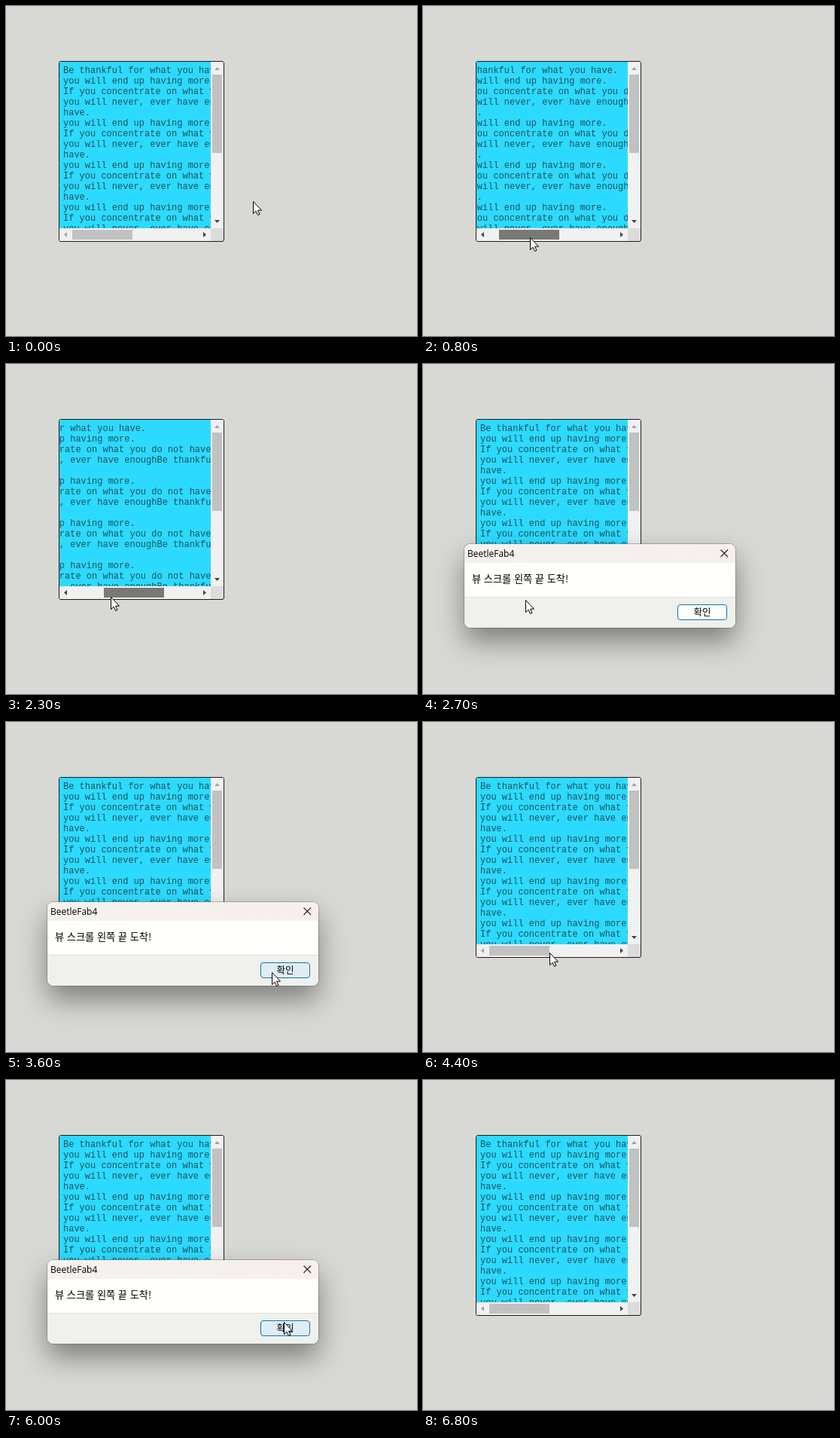
Write an HTML page that moves like this. It is 546 px wide and 438 px high and loops after 6.9 s.

```html
<!DOCTYPE html>
<html lang="ko">
<head>
<meta charset="utf-8">
<title>Scroll view</title>
<style>
html, body { margin: 0; width: 100%; height: 100%; overflow: hidden; background: #d8d9d4; }
#stage { position: relative; width: 546px; height: 438px; overflow: hidden; }
#stage div, #stage svg, pre { position: absolute; box-sizing: border-box; }
#panel { left: 70px; top: 73px; width: 220px; height: 240px; border: 1px solid #1c1c1c; border-radius: 3px; overflow: hidden; background: #dcdcdc; }
#view { left: 0; top: 0; width: 201px; height: 221px; overflow: hidden; background: #2ddaff; }
pre { margin: 0; left: 5px; top: 5px; font: 12px/14px "Liberation Mono", "Courier New", monospace; color: #1d4f5c; }
.bar { background: #f1f1f1; }
#vbar { left: 201px; top: 0; width: 17px; height: 221px; }
#hbar { left: 0; top: 221px; width: 201px; height: 17px; }
.thumb { background: #c1c1c1; }
#vthumb { left: 2px; top: 17px; width: 13px; height: 104px; }
#hthumb { left: 17px; top: 2px; width: 80px; height: 13px; }
#arrows { left: 0; top: 0; }
#dialog { left: 55px; top: 239px; width: 360px; height: 111px; border-radius: 8px; background: #fffffc;
  box-shadow: 0 0 0 1px rgba(90,90,90,.4), 0 18px 36px rgba(0,0,0,.42); color: #000; white-space: nowrap; }
#title { left: 0; top: 0; width: 360px; height: 25px; border-radius: 8px 8px 0 0; background: linear-gradient(90deg, #f5f2ee, #f7efed); }
#name { left: 4px; top: 4px; font: 12px/17px "Open Sans", sans-serif; }
#msg { left: 10px; top: 36px; font: 13.2px/20px "Noto Sans CJK KR", "Noto Sans CJK", sans-serif; }
#foot { left: 0; top: 70px; width: 360px; height: 41px; border-top: 1px solid #dfdfdb; border-radius: 0 0 8px 8px; background: #f0f0ec; }
#ok { left: 283px; top: 80px; width: 66px; height: 21px; border: 1px solid #0f76ae; border-radius: 4px; background: #fdfdfb;
  text-align: center; font: 12.5px/17px "Noto Sans CJK KR", "Noto Sans CJK", sans-serif; }
#close { left: 340px; top: 7px; }
#cursor { left: 0; top: 0; overflow: visible; }
</style>
</head>
<body>
<div id="stage">
  <div id="panel">
    <div id="view"><pre id="text"></pre></div>
    <div id="vbar" class="bar"><div id="vthumb" class="thumb"></div></div>
    <div id="hbar" class="bar"><div id="hthumb" class="thumb"></div></div>
    <svg id="arrows" width="218" height="238">
      <path d="M206 11h7l-3.5-4z" fill="#a3a3a3"/>
      <path d="M206 210h7l-3.5 4z" fill="#444"/>
      <path id="left" d="M10 226v7l-4-3.5z"/>
      <path id="right" d="M191 226v7l4-3.5z"/>
    </svg>
  </div>
  <div id="dialog">
    <div id="title"></div>
    <div id="name">BeetleFab4</div>
    <svg id="close" width="11" height="11"><path d="M.5.5l9.5 9.5M10 .5L.5 10" stroke="#222" stroke-width="1.1"/></svg>
    <div id="msg">뷰 스크롤 왼쪽 끝 도착!</div>
    <div id="foot"></div>
    <div id="ok">확인</div>
  </div>
  <svg id="cursor" width="13" height="20">
    <path d="M.5.5V16.6L4.1 13.2 6.5 18.5 8.9 17.4 6.6 12.2H11.5Z" fill="#fff" stroke="#000"/>
  </svg>
</div>
<script>
const LOOP = 6900, STEP = 100, LEAVE = 6500;
const LAG = 100, GRIP = 122, TRAVEL = 87, SCROLL = 219;
const $ = id => document.getElementById(id);

const block = [
  "you will end up having more.",
  "If you concentrate on what you do not have,",
  "you will never, ever have enoughBe thankful for what you",
  "have."
].join("\n");
$("text").textContent = "Be thankful for what you have.\n" + Array(4).fill(block).join("\n");

// Pointer stops: time, x, y
const stops = [
  [0, 328, 259], [500, 122, 305], [1200, 168, 309], [1700, 240, 309],
  [1900, 240, 309], [2500, 88, 309], [3600, 353, 332], [4600, 122, 299],
  [4800, 140, 299], [5100, 110, 299], [6000, 369, 321], [6400, 271, 286]
];
// Each round: thumb grabbed, alert opens, alert closes
const rounds = [[500, 2600, 3700], [4600, 5200, 6100]];

function pointer(t) {
  const i = stops.findIndex(s => s[0] > t);
  if (i < 0) return stops[stops.length - 1].slice(1);
  const [t0, x0, y0] = stops[i - 1], [t1, x1, y1] = stops[i];
  const p = (t - t0) / (t1 - t0);
  return [x0 + (x1 - x0) * p, y0 + (y1 - y0) * p];
}

// The thumb trails the pointer by LAG and stops at both ends of its track
function thumbAt(t, grab) {
  const [x] = pointer(Math.max(grab, t - LAG));
  return Math.round(Math.min(TRAVEL, Math.max(0, x - GRIP)));
}

const show = (el, on) => { el.style.visibility = on ? "visible" : "hidden"; };
const move = (el, x, y) => { el.style.transform = `translate(${x}px, ${y}px)`; };

function draw(t) {
  const [x, y] = pointer(t).map(Math.round);
  const drag = rounds.find(([grab, open]) => t >= grab && t < open);
  const pos = drag ? thumbAt(t, drag[0]) : 0;
  const hover = x >= 338 && x < 404 && y >= 319 && y < 340;
  const arrow = end => !drag && pos === end ? "#a3a3a3" : "#444";

  move($("text"), -Math.round(pos * SCROLL / TRAVEL), 0);
  move($("hthumb"), pos, 0);
  $("hthumb").style.background = drag ? "#787974" : "#c1c1c1";
  $("left").style.fill = arrow(0);
  $("right").style.fill = arrow(TRAVEL);

  show($("dialog"), rounds.some(([, open, close]) => t >= open && t < close));
  $("ok").style.background = hover ? "#dfedf6" : "#fdfdfb";
  move($("cursor"), x, y);
  show($("cursor"), t < LEAVE);
}

const start = performance.now();
function tick(now) {
  const t = Math.max(0, now - start) % LOOP;
  draw(Math.floor(t / STEP) * STEP);
  requestAnimationFrame(tick);
}
draw(0);
requestAnimationFrame(tick);
</script>
</body>
</html>
```
